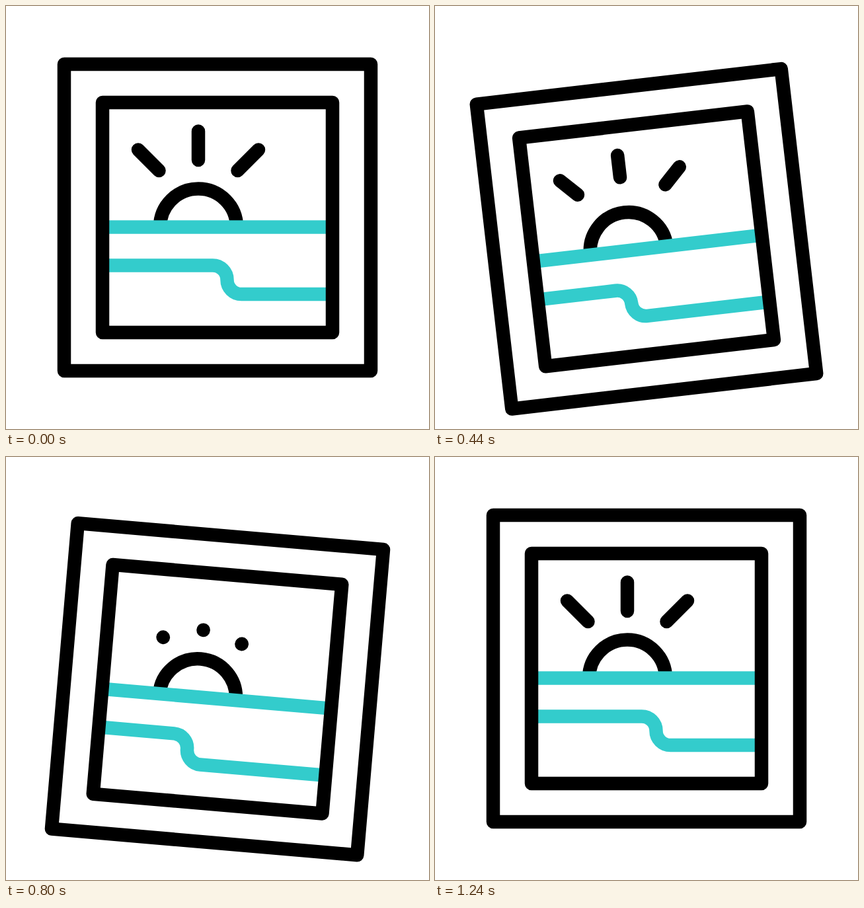
Animation of 640 by 640 pixels, one loop 1280 ms. Source, as an HTML page:

```html
<!DOCTYPE html>
<html>
<head>
<meta charset="utf-8">
<title>Swinging picture</title>
<style>
  html, body { margin: 0; width: 100%; height: 100%; overflow: hidden; background: #fff; }
  svg { display: block; width: 100vw; height: 100vh; }
  #picture { fill: none; stroke: #000; stroke-width: 20.5; stroke-linejoin: round; }
  .water { stroke: #3cc; }
  #rays { stroke-linecap: round; }
</style>
</head>
<body>
<svg viewBox="-320 -320 640 640">
  <g id="picture">
    <path d="M-87 14.5a58 58 0 0 1 116 0"/>
    <g id="rays"></g>
    <path class="water" d="M-174 14.5H174"/>
    <path class="water" id="wave"/>
    <rect x="-174" y="-174" width="348" height="348"/>
    <rect x="-232" y="-232" width="464" height="464"/>
  </g>
</svg>
<script>
const LOOP = 1280, STEP = 40;
const picture = document.getElementById('picture');
const wave = document.getElementById('wave');
const rays = document.getElementById('rays');

// Inner end of each ray, then the vector to its outer end
const RAYS = [[-88.5, -71, -31.5, -31.5], [-29, -87, 0, -43.5], [30.5, -71, 31.5, -31.5]];

// Keys are [time, value]
const ANGLE = [[40, 0], [360, -7], [840, 5], [1240, 0]];
const DROP = [[40, 0], [600, 36.4], [1240, 0]];
const SHIFT = [[40, 0], [640, -58], [1240, 0]];
const RAY_START = [[320, 0], [640, 1]];
const RAY_END = [[760, 0], [1160, 1]];

// cubic-bezier(.6, 0, .4, 1)
function ease(p) {
  let lo = 0, hi = 1;
  for (let i = 0; i < 24; i++) {
    const s = (lo + hi) / 2, r = 1 - s;
    if (1.8 * s * r * r + 1.2 * s * s * r + s ** 3 < p) lo = s; else hi = s;
  }
  return lo * lo * (3 - 2 * lo);
}

function valueAt(keys, t) {
  if (t <= keys[0][0]) return keys[0][1];
  for (let i = 1; i < keys.length; i++) {
    const [t0, v0] = keys[i - 1], [t1, v1] = keys[i];
    if (t < t1) return v0 + (v1 - v0) * ease((t - t0) / (t1 - t0));
  }
  return keys[keys.length - 1][1];
}

function rayPath(from, to) {
  return RAYS.map(([x, y, dx, dy]) =>
    `M${x + dx * from} ${y + dy * from}L${x + dx * to} ${y + dy * to}`).join('');
}

const rayLine = document.createElementNS('http://www.w3.org/2000/svg', 'path');
rays.append(rayLine);

function draw(t) {
  picture.setAttribute('transform', `translate(0 ${valueAt(DROP, t)}) rotate(${valueAt(ANGLE, t)})`);
  wave.setAttribute('d', `M-174 72.5H${valueAt(SHIFT, t) - 7.25}` +
    'a21.75 21.75 0 0 1 21.75 21.75a21.75 21.75 0 0 0 21.75 21.75H174');

  // Rays retract outwards, vanish, then grow again from the sun
  const shrinking = t < 640;
  const from = shrinking ? valueAt(RAY_START, t) : 0;
  const to = shrinking ? 1 : valueAt(RAY_END, t);
  rayLine.setAttribute('d', to > from ? rayPath(from, to) : '');
}

function tick() {
  const t = performance.now() % LOOP;
  draw(Math.floor(t / STEP) * STEP);
  requestAnimationFrame(tick);
}
tick();
</script>
</body>
</html>
```
